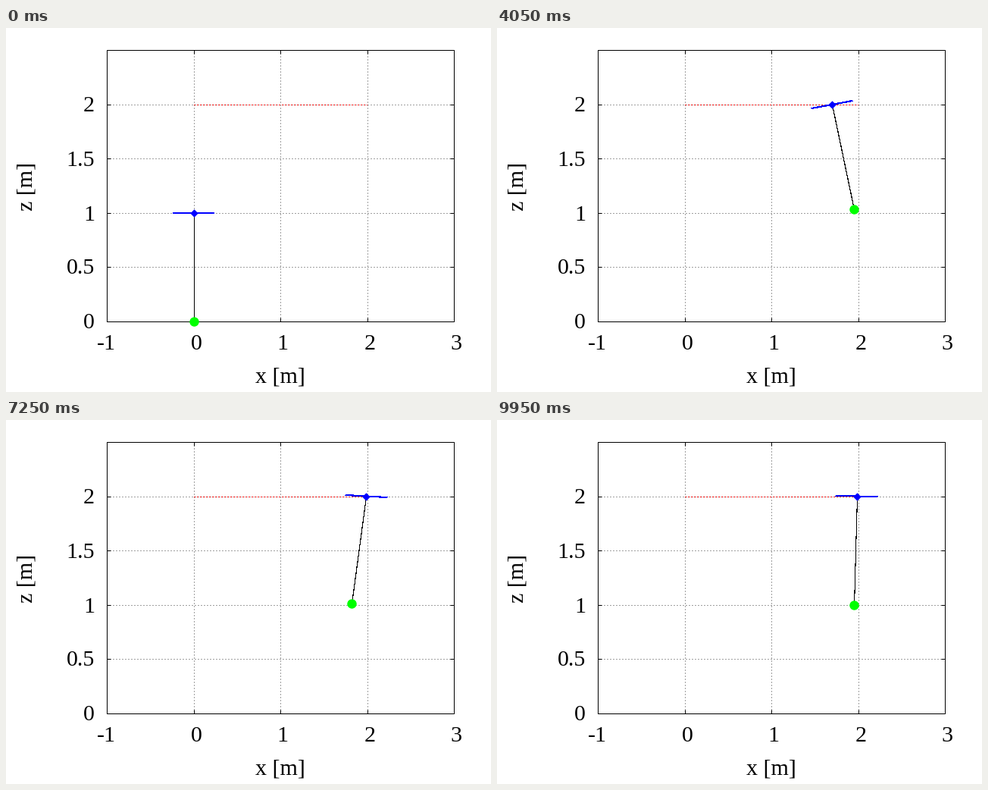
These frames come from a looping animation (640x480 px, 10 s). A matplotlib script:

```python
import numpy as np
import matplotlib.pyplot as plt
from matplotlib.animation import FuncAnimation
from matplotlib.patches import Circle, RegularPolygon

W, H, DPI = 640, 480, 100
PX = 72 / DPI                     # points per pixel
LEFT, RIGHT, TOP, BOTTOM = 133, 591, 29, 387
SX, SZ = 114.5, 143.2             # pixels per metre
STEP = 50
OMEGA = 3.13                      # swing rate of the 1 m pendulum
HALF_BLADE = 0.24
GO, TURN, STOP = 2.0, 3.49, 4.85  # start, begin braking, arrive
PUSH, BRAKE = 0.96, 1.048         # accelerations
PEAK, REST = 2.035, 1.985         # farthest and final x


def blend(t, a, b):
    s = min(max((t - a) / (b - a), 0), 1)
    return s * s * (3 - 2 * s)


def height(t):
    return 2 - (1 + 12 * t) * np.exp(-12 * t)


def travel(t):
    if t < GO:
        return 0.0
    if t < TURN:
        return PUSH / 2 * (t - GO) ** 2
    if t < STOP:
        return PEAK - BRAKE / 2 * (STOP - t) ** 2
    return REST + (PEAK - REST) * np.exp(STOP - t)


def swing(t):
    """Load angle: lag while speeding up, lead while braking, then free."""
    if t <= GO:
        return 0.0
    lag = -0.105 * (1 - np.cos(OMEGA * (t - GO)))
    lead = 0.105 + 0.24 * np.cos(OMEGA * (t - 4.33))
    free = -(0.25 - 0.0125 * (t - 5.5)) * np.cos(OMEGA * (t - 9.5))
    first = lag + (lead - lag) * blend(t, 3.35, 3.55)
    return first + (free - first) * blend(t, 4.65, 5.0)


def tilt(t):
    """Lean that gives the acceleration and holds the load's pull."""
    if t <= GO:
        return 0.0
    acc = (PUSH - (PUSH + BRAKE) * blend(t, 3.35, 3.65)
           + BRAKE * blend(t, 4.7, 5.2))
    return 0.25 * swing(t) - 0.75 * acc / 9.8


def px(x):
    return np.floor(LEFT + SX * (x + 1) + 0.5)


def pz(z):
    return np.floor(BOTTOM - SZ * z + 0.5)


fig = plt.figure(figsize=(W / DPI, H / DPI), dpi=DPI, facecolor="white")
ax = fig.add_axes([0, 0, 1, 1])
ax.set_xlim(0, W)
ax.set_ylim(H, 0)
ax.axis("off")


def line(xs, ys, color="black", width=1, cap="butt", **kw):
    return ax.plot(xs, ys, color=color, lw=width * PX, snap=False,
                   solid_capstyle=cap, dash_capstyle="butt", **kw)[0]


def label(x, y, s, **kw):
    ax.text(x, y, s, family="Liberation Serif", size=30 * PX,
            va="baseline", **kw)


def tick(x, y, dx, dy):
    line([x, x + dx], [y, y + dy], zorder=2)


L, R, T, B = (v + 0.5 for v in (LEFT, RIGHT, TOP, BOTTOM))
DASH = (0, (2, 2))

for x in range(-1, 4):
    p = px(x) + 0.5
    if -1 < x < 3:
        line([p, p], [BOTTOM, TOP], "#a0a0a0", linestyle=DASH, zorder=1)
        tick(p, B, 0, -5)
        tick(p, T, 0, 5)
    label(132 if x < 0 else p + 2.5, 424, str(x), ha="center")

for z in np.arange(0, 2.5, 0.5):
    p = pz(z) + 0.5
    if z > 0:
        line([LEFT, RIGHT], [p, p], "#a0a0a0", linestyle=DASH, zorder=1)
        tick(L, p, 5, 0)
        tick(R, p, -5, 0)
    label(117, p + 9, f"{z:g}", ha="right")

line([L, R, R, L, L], [B, B, T, T, B], cap="projecting", zorder=2)
line([px(0), px(2)], [pz(2) + 0.5] * 2, "#ff0000", linestyle=DASH, zorder=2)
label(362, 467, "x [m]", ha="center")
label(34.5, 208.5, "z [m]", ha="center", rotation=90, rotation_mode="anchor")

# Hard-edged strokes fill every pixel they touch, so they are drawn thin.
rod = line([], [], width=0.1, antialiased=False, zorder=3)
blade = line([], [], "#0000ff", width=1.1, antialiased=False, zorder=4)
body = RegularPolygon((0, 0), 4, radius=5.25, fc="#0000ff", lw=0,
                      snap=False, zorder=5)
load = Circle((0, 0), 6.2, fc="#00ff00", lw=0, snap=False, zorder=5)
ax.add_patch(body)
ax.add_patch(load)


def draw(i):
    t = i * STEP / 1000
    x, z = travel(t), height(t)
    phi, th = swing(t), tilt(t)
    hub = px(x) + 0.5, pz(z) + 0.5
    end = px(x + np.sin(phi)) + 0.5, pz(z - np.cos(phi)) + 0.5
    dx, dz = HALF_BLADE * np.cos(th), HALF_BLADE * np.sin(th)
    rod.set_data(*zip(hub, end))
    blade.set_data([px(x - dx), px(x + dx)], [pz(z - dz), pz(z + dz)])
    body.xy = hub
    load.center = end
    return rod, blade, body, load


anim = FuncAnimation(fig, draw, frames=200, interval=STEP, repeat=True,
                     repeat_delay=0, blit=False)
plt.show()
```
